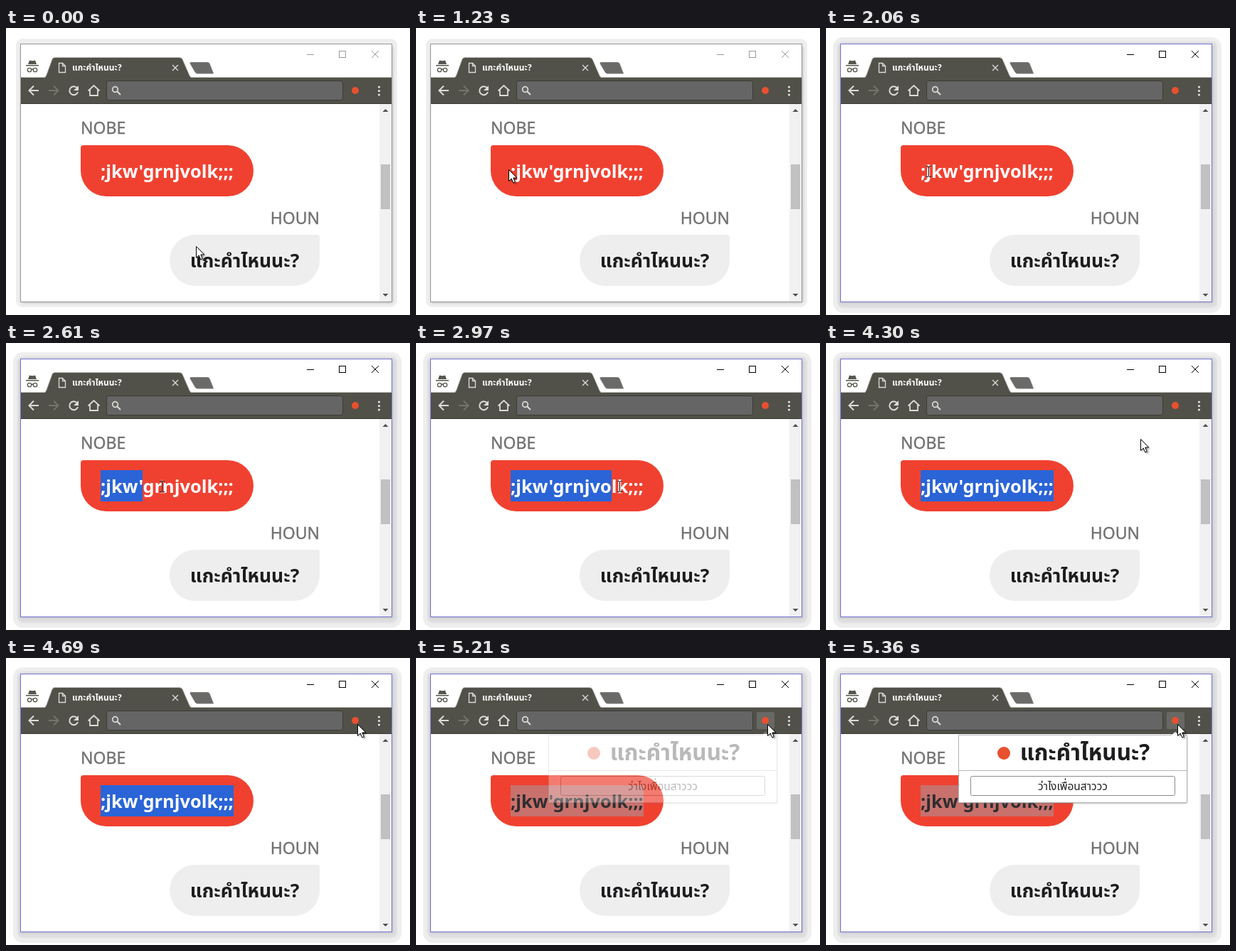
An HTML page for the animation above (6.99 s loop, 568 px wide and 404 px high).

```html
<!DOCTYPE html>
<html lang="th">
<head>
<meta charset="utf-8">
<title>Chat demo</title>
<style>
  html, body { margin: 0; width: 100%; height: 100%; overflow: hidden; background: #fff; }
  svg { display: block; width: 568px; height: 404px; }
  text { font-family: "Noto Sans", "Noto Sans Thai", "Open Sans", sans-serif; white-space: pre; }
  .crisp { shape-rendering: crispEdges; }
  .line { fill: none; stroke: #dcdcd8; stroke-width: 2; }
  .thin { fill: none; stroke: #dcdcd8; stroke-width: 1.3; }
  .name { font-size: 23px; font-weight: 500; fill: #727272; stroke: #727272; stroke-width: .4; }
  .chat { font-size: 26.5px; font-weight: 600; }
</style>
</head>
<body>
<svg viewBox="0 0 568 404" xmlns="http://www.w3.org/2000/svg">
  <defs>
    <filter id="soft" x="-50%" y="-50%" width="200%" height="200%">
      <feGaussianBlur stdDeviation="1.2"/>
    </filter>
  </defs>

  <!-- window shadows: idle and focused -->
  <g id="idleShadow">
    <rect x="14" y="15" width="536" height="378" rx="9" fill="#eee"/>
    <rect x="20" y="24" width="525" height="364" rx="5" fill="#cfcfcf" filter="url(#soft)"/>
  </g>
  <g id="focusShadow">
    <rect x="10" y="13" width="546" height="388" rx="14" fill="#eee"/>
    <rect x="16" y="19" width="534" height="375" rx="8" fill="#dedee0" filter="url(#soft)"/>
    <rect x="19" y="24" width="526" height="364" rx="4" fill="#cacace" filter="url(#soft)"/>
  </g>

  <!-- window -->
  <rect x="20.5" y="22.5" width="522" height="363" fill="#fff"/>
  <g id="controls" fill="none" class="crisp">
    <path d="M423 37.5h10M468.5 32.5h9v9h-9z"/>
    <path d="M514 32l10 10M524 32l-10 10" shape-rendering="auto"/>
  </g>

  <!-- private mode icon -->
  <g fill="#55554d">
    <path d="M31 51l2-5.500q4 1.500 8 0l2 5.500z"/>
    <rect x="28" y="52" width="18" height="1.500"/>
    <g fill="none" stroke="#55554d" stroke-width="1.300">
      <circle cx="33" cy="59" r="2.700"/><circle cx="41" cy="59" r="2.700"/>
      <path d="M35.700 58.500q1.300-1 2.600 0"/>
    </g>
  </g>

  <!-- tab strip and toolbar -->
  <path d="M21 70H54Q56 69 57 66L65 44Q66 42 68 42H244Q247 42 248 44L258 67Q259 70 262 70H542V107H21Z" fill="#515149"/>
  <path d="M21 69.500H54Q56 69 57 66L65 44Q66 41.500 68 41.500H244Q247 41.500 248 44L258 67Q259 69.500 262 69.500H542" fill="none" stroke="#a5a5a0" stroke-width=".8"/>
  <path d="M21 106.500H542" stroke="#3c3c37"/>
  <path d="M260 48.500H283Q285 48.500 286 50L291.500 64H269Q267 64 266 62L259 50Q258.500 48.500 260 48.500Z" fill="#6a6a68" stroke="#7c7c7a"/>
  <path class="thin" d="M74.500 49.500h5l4 4v9h-9zM79.500 49.500v4h4"/>
  <path class="thin" d="M234 52l8 8M242 52l-8 8"/>
  <text x="93" y="60" font-size="12" font-weight="600" fill="#fff" class="title"></text>

  <path class="line" d="M46 88H33M39 81.500L32.500 88L39 94.500"/>
  <path class="line" d="M60 88H73M67 81.500L73.500 88L67 94.500" style="stroke:#74746d"/>
  <path class="line" d="M100 84.500A6 6 0 1 0 101 90"/>
  <path d="M102 81v7h-7z" fill="#dcdcd8"/>
  <path class="line" d="M115.500 88.500L123.500 81L131.500 88.500M118 87v8h11v-8" style="stroke-width:1.800"/>
  <rect x="141.500" y="74.500" width="332" height="27" rx="3" fill="#656565" stroke="#3b3b36"/>
  <circle cx="153.500" cy="86.500" r="3.800" class="line" style="stroke-width:1.700"/>
  <path class="line" d="M156.500 89.500l4.500 4.500"/>
  <rect id="pressed" x="479" y="76" width="25" height="24" rx="2" fill="#686864"/>
  <circle cx="491" cy="88" r="5" fill="#e8502f"/>
  <g fill="#e4e4e0">
    <circle cx="524.500" cy="83" r="1.600"/><circle cx="524.500" cy="88.500" r="1.600"/><circle cx="524.500" cy="94" r="1.600"/>
  </g>

  <!-- scrollbar -->
  <rect x="525" y="107" width="17" height="278" fill="#f1f1f1"/>
  <rect x="527" y="192" width="13" height="63" fill="#c1c1c1"/>
  <path d="M529.500 118l4-4l4 4zM529.500 374l4 4l4-4z" fill="#505050"/>

  <!-- chat -->
  <text x="105" y="149" class="name">NOBE</text>
  <path d="M109 165H312A36 36 0 0 1 312 237H141A36 36 0 0 1 105 201V169Q105 165 109 165Z" fill="#f04130"/>
  <rect id="selection" class="crisp" x="133" y="179" height="44"/>
  <text id="typed" x="133" y="211" class="chat" style="font-size:25.4px">;jkw'grnjvolk;;;</text>
  <text x="441" y="276" class="name" text-anchor="end">HOUN</text>
  <path d="M266 291H437Q441 291 441 295V327A36 36 0 0 1 405 363H266A36 36 0 0 1 266 291Z" fill="#eee"/>
  <text x="335.500" y="337" text-anchor="middle" class="chat title" fill="#1d1d1f"></text>

  <rect id="border" class="crisp" x="20.500" y="22.500" width="522" height="363" fill="none"/>

  <!-- extension popup -->
  <g id="popup">
    <rect x="187" y="110" width="321" height="95" rx="2" fill="#777" opacity=".5" filter="url(#soft)"/>
    <path d="M186.500 108.500H486L491 104L496 108.500H507.500V203.500H186.500Z" fill="#fff" stroke="#b5b5b5"/>
    <path d="M187 158.500H507" stroke="#b5b5b5"/>
    <circle cx="250" cy="134" r="9" fill="#e8502f"/>
    <text x="364" y="144" text-anchor="middle" font-size="31.500" font-weight="700" fill="#1d1d1f" class="title"></text>
    <rect x="203.500" y="166.500" width="287" height="27" rx="2" fill="#fff" stroke="#8a8a8a"/>
    <text x="347" y="186" text-anchor="middle" font-size="15.500" fill="#222">ว่าไงเพื่อนสาววว</text>
  </g>

  <!-- pointers -->
  <g id="arrow">
    <path d="M2 2V18L6 15L9 21L12 20L9.500 14H14Z" fill="#000" opacity=".35" filter="url(#soft)"/>
    <path d="M.5 .5V16.500L4.200 13L6.800 19L9.300 18L6.800 12H11.800Z" fill="#fff" stroke="#000"/>
  </g>
  <g id="beam" fill="none" class="crisp">
    <path d="M-3-8H4M-3 8H4M.5-8V8" stroke="#fff" stroke-width="3" opacity=".3"/>
    <path d="M-3-7.500H0M1-7.500H4M-3 7.500H0M1 7.500H4M.5-7V7" stroke="#000"/>
  </g>
</svg>
<script>
const LOOP = 6990;
const FOCUS = 1610, DRAG = 2060, LEAVE = 3840, CLICK = 4990, BLUR = 5150;
const LAG = 110;
const $ = id => document.getElementById(id);
const typed = $("typed");

document.querySelectorAll(".title").forEach(el => el.textContent = "แกะคำไหนนะ?");

// [time, x, y]
const path = [
  [0, 267, 307], [130, 267, 307], [230, 259, 299], [400, 212, 258], [560, 157, 215],
  [680, 133, 197], [770, 129, 199], [870, 129, 199], [900, 130, 199],
  [1230, 130, 199], [1260, 131, 199], [1420, 131, 199], [1450, 144, 201],
  [DRAG, 144, 202], [2400, 175, 202], [2620, 221, 202], [2730, 249, 202],
  [2860, 276, 202], [2970, 286, 202], [3420, 320, 202],
  [3810, 320, 202], [LEAVE, 321, 203], [4000, 350, 188], [4200, 412, 152],
  [4400, 471, 118], [4510, 489, 109], [4690, 494, 93], [LOOP, 494, 93]
];

function at(t) {
  const i = Math.max(1, path.findIndex(p => p[0] >= t));
  const [t0, x0, y0] = path[i - 1], [t1, x1, y1] = path[i];
  const k = (t - t0) / (t1 - t0);
  return [Math.round(x0 + (x1 - x0) * k), Math.round(y0 + (y1 - y0) * k)];
}

// Selection end snaps to the nearest letter edge.
function selectionWidth(t) {
  if (t <= DRAG + LAG) return 0;
  const count = typed.getNumberOfChars();
  const x = at(t - LAG)[0] - 133;
  let end = 0;
  for (let n = 1; n <= count; n++) {
    const edge = typed.getSubStringLength(0, n);
    if (x < (end + edge) / 2) break;
    end = edge;
  }
  return end;
}

const show = (id, on) => $(id).style.display = on ? "" : "none";

function draw(t) {
  const focus = t < FOCUS ? 0 : t < 1700 ? 0.5 : t < 1800 ? 0.8 : 1;
  $("focusShadow").style.opacity = focus;
  $("controls").setAttribute("stroke", focus ? "#000" : "#999");
  $("border").setAttribute("stroke", focus ? "#7373d2" : "#979797");

  const blurred = t >= BLUR;
  $("selection").setAttribute("width", Math.round(selectionWidth(t)));
  $("selection").setAttribute("fill", blurred ? "#c8716d" : "#2a64d7");
  typed.setAttribute("fill", blurred ? "#2d2d2f" : "#fff");

  show("pressed", t >= CLICK);
  show("popup", blurred);
  $("popup").style.opacity = Math.min(1, Math.max(0, (t - BLUR) / 200));

  const text = t >= 1450 && t < LEAVE;
  const [x, y] = at(t);
  show("beam", text);
  show("arrow", !text);
  $(text ? "beam" : "arrow").setAttribute("transform", `translate(${x} ${y})`);
}

const start = performance.now();
function tick() {
  draw((performance.now() - start) % LOOP);
  requestAnimationFrame(tick);
}
draw(0);
requestAnimationFrame(tick);
</script>
</body>
</html>
```
